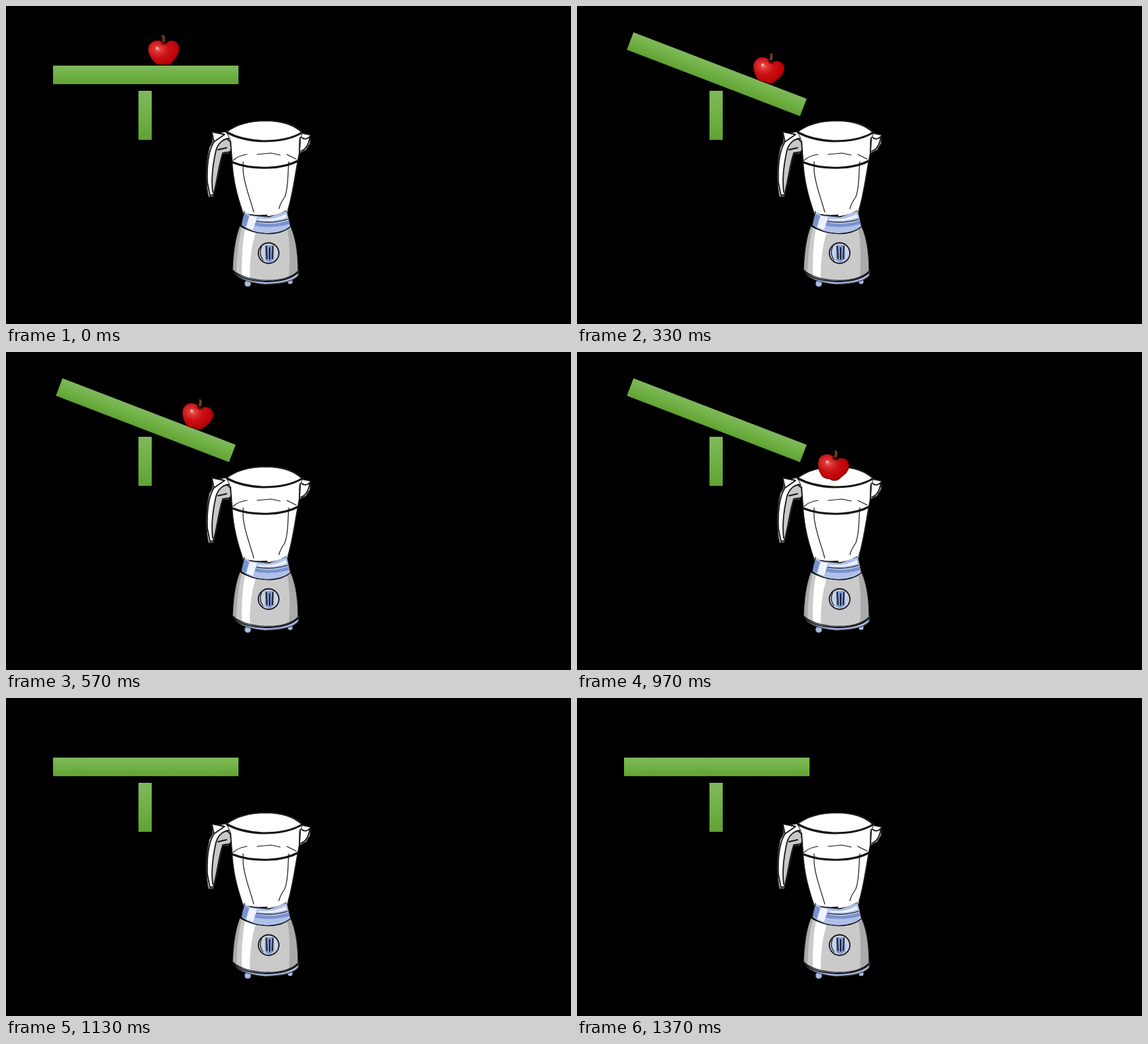
Write an HTML page that moves like this. It is 853 by 480 pixels and loops after 1530 ms.

```html
<!DOCTYPE html>
<html lang="en">
<head>
<meta charset="utf-8">
<title>Apple and blender</title>
<style>
  html, body { margin: 0; width: 100%; height: 100%; overflow: hidden; background: #000; }
  svg { display: block; width: 100%; height: 100%; }
  .ink { fill: none; stroke: #151515; stroke-width: 1.8; stroke-linecap: round; stroke-linejoin: round; }
  .bold { stroke-width: 3.2; }
  .fine { stroke-width: 1.2; }
  .rim { stroke: #454545; stroke-width: 1.2; stroke-linejoin: round; }
</style>
</head>
<body>
<svg viewBox="0 0 853 480">
  <defs>
    <linearGradient id="green" x2="0" y2="1">
      <stop stop-color="#80b85c"/>
      <stop offset=".5" stop-color="#6fb144"/>
      <stop offset="1" stop-color="#61a235"/>
    </linearGradient>
    <radialGradient id="red" cx=".32" cy=".36" r=".68">
      <stop stop-color="#f08078"/>
      <stop offset=".16" stop-color="#dc3a38"/>
      <stop offset=".5" stop-color="#cb1014"/>
      <stop offset="1" stop-color="#b40005"/>
    </radialGradient>
    <clipPath id="bodyShape">
      <path id="bodyPath" d="M353 332C346 349 343 371 342 398C350 407 369 413 391 414C414 415 433 409 441 400C441 374 438 351 430 333C411 349 376 346 353 332Z"/>
    </clipPath>
  </defs>

  <rect id="plank" x="71" y="90" width="280" height="28" fill="url(#green)"/>
  <rect x="200" y="128" width="20" height="74" fill="url(#green)"/>

  <g id="blender">
    <!-- handle -->
    <path class="rim" fill="#fff" d="M311 190L321 192L332 190L340 198L341 215L336 222L327 223C322 242 319 266 313 287L306 288C302 271 301 242 307 214L312 205Z"/>
    <path fill="#c8c8c8" d="M338 199C328 201 320 207 317 218C312 240 310 266 312 285C318 266 321 241 327 222L338 219Z"/>
    <path class="ink" d="M311 191L314 205L330 194L321 192L311 190M314 205C306 218 303 241 304 266L308 286L313 285C319 265 321 239 327 223M338 200C328 200 320 207 317 218C312 240 310 264 312 281M333 200L341 207L339 220L327 222M320 217L333 214"/>

    <!-- spout and jar -->
    <path class="rim" fill="#fff" d="M445 192L459 195L459 207L453 217L443 222Z"/>
    <path class="ink" d="M446 198C450 202 455 201 459 197M445 219C453 217 457 209 459 197"/>
    <path class="rim" fill="#fff" d="M333 190C346 179 368 173 394 173C420 173 438 181 448 191L443 203L443 223C437 251 434 285 425 311L400 319L358 313C350 291 342 265 341 231L338 201Z"/>
    <path class="ink bold" d="M334 191C347 198 362 203 388 204C414 204 434 199 447 191M342 236C357 242 378 245 398 244C418 243 431 239 440 234M380 319C397 320 413 316 423 310"/>
    <path class="ink" d="M333 190C347 179 368 173 394 173C421 174 438 182 447 191M339 204L341 232C342 264 350 290 357 311M444 199L443 222C437 251 433 286 426 307M358 313C367 317 380 317 394 316"/>
    <path class="ink fine" d="M343 233C349 227 356 225 364 224M379 224L400 222L414 225M424 224L438 231M358 235L358 249C360 272 369 291 374 311M427 235C425 253 427 272 421 288Q414 298 412 306"/>

    <!-- collar -->
    <path fill="#b0c0e8" d="M360 310L369 316L397 319L424 309L429 333C411 348 376 347 355 331Q357 319 360 310Z"/>
    <path fill="#7891d0" d="M359 313L367 317L362 333L355 330ZM375 326Q399 333 427 324L428 329Q399 337 373 331Z"/>
    <path fill="#eef2fc" d="M368 316L379 319L373 338L363 334ZM381 321Q405 324 422 314L424 319Q402 327 381 323Z"/>
    <path class="ink fine" d="M360 310Q357 320 355 331C376 347 411 348 430 333L425 311M378 325Q402 329 425 322"/>

    <!-- base -->
    <g stroke="#303030">
      <circle cx="365" cy="419" r="5" fill="#a9bce5"/>
      <circle cx="429" cy="416" r="4" fill="#a9bce5"/>
    </g>
    <path class="rim" fill="#adbee9" d="M343 399Q349 416 391 420Q431 419 441 407L442 399Z"/>
    <use href="#bodyPath" fill="#cacaca"/>
    <g clip-path="url(#bodyShape)">
      <path fill="#aaa" d="M347 334L356 334Q348 365 348 410L340 405ZM425 338L435 332L445 405L427 414Q430 365 425 338Z"/>
      <path fill="#fff" d="M361 335L377 341Q367 373 368 414L356 409Q355 366 361 335Z"/>
    </g>
    <use href="#bodyPath" class="ink fine"/>
    <path class="ink" d="M343 400C351 411 369 415 392 416C414 416 432 411 441 402"/>

    <!-- knob -->
    <circle class="ink" cx="396.5" cy="373" r="15.5" style="fill:#c9d2e7"/>
    <path fill="#8198d0" d="M391 361L404 361L405 382L399 387L391 384Z"/>
    <path class="ink" d="M393 363L394 381M403 363L402 381M398 365L398 382"/>
    <path class="ink fine" d="M386 363Q381 374 388 383"/>
  </g>

  <g id="apple">
    <path d="M-2-14Q-1-21-4-23L0-24Q3-20 2-13Z" fill="#713b20"/>
    <path d="M-2-13C-9-18-18-15-22-8C-26 0-20 11-14 17C-10 22-4 21 0 20C6 23 13 20 16 13C23 6 26-4 21-11C16-17 8-15 4-12Q1-10-2-13Z" fill="url(#red)" stroke="#520b0b"/>
    <path d="M-4-12Q1-7 6-12" fill="none" stroke="#6e0d0d" stroke-width="2"/>
    <circle cx="-10" cy="-4" r="2" fill="#f6b0a8"/>
  </g>
</svg>
<script>
  const LOOP = 1530;
  const LEVEL = "";
  const TILTED = "translate(0 -1) rotate(21 211 104)";
  const poses = [
    { until: 330, plank: LEVEL, apple: "translate(238 67.5)" },
    { until: 730, plank: TILTED, apple: "translate(289 95) rotate(14)" },
    { until: 1130, plank: TILTED, apple: "translate(386.5 172) rotate(14)" },
    { until: LOOP, plank: LEVEL, apple: null }
  ];
  const plank = document.getElementById("plank");
  const apple = document.getElementById("apple");

  function draw() {
    const time = performance.now() % LOOP;
    const pose = poses.find(p => time < p.until);
    plank.setAttribute("transform", pose.plank);
    apple.setAttribute("visibility", pose.apple ? "visible" : "hidden");
    if (pose.apple) apple.setAttribute("transform", pose.apple);
    requestAnimationFrame(draw);
  }
  draw();
</script>
</body>
</html>
```
